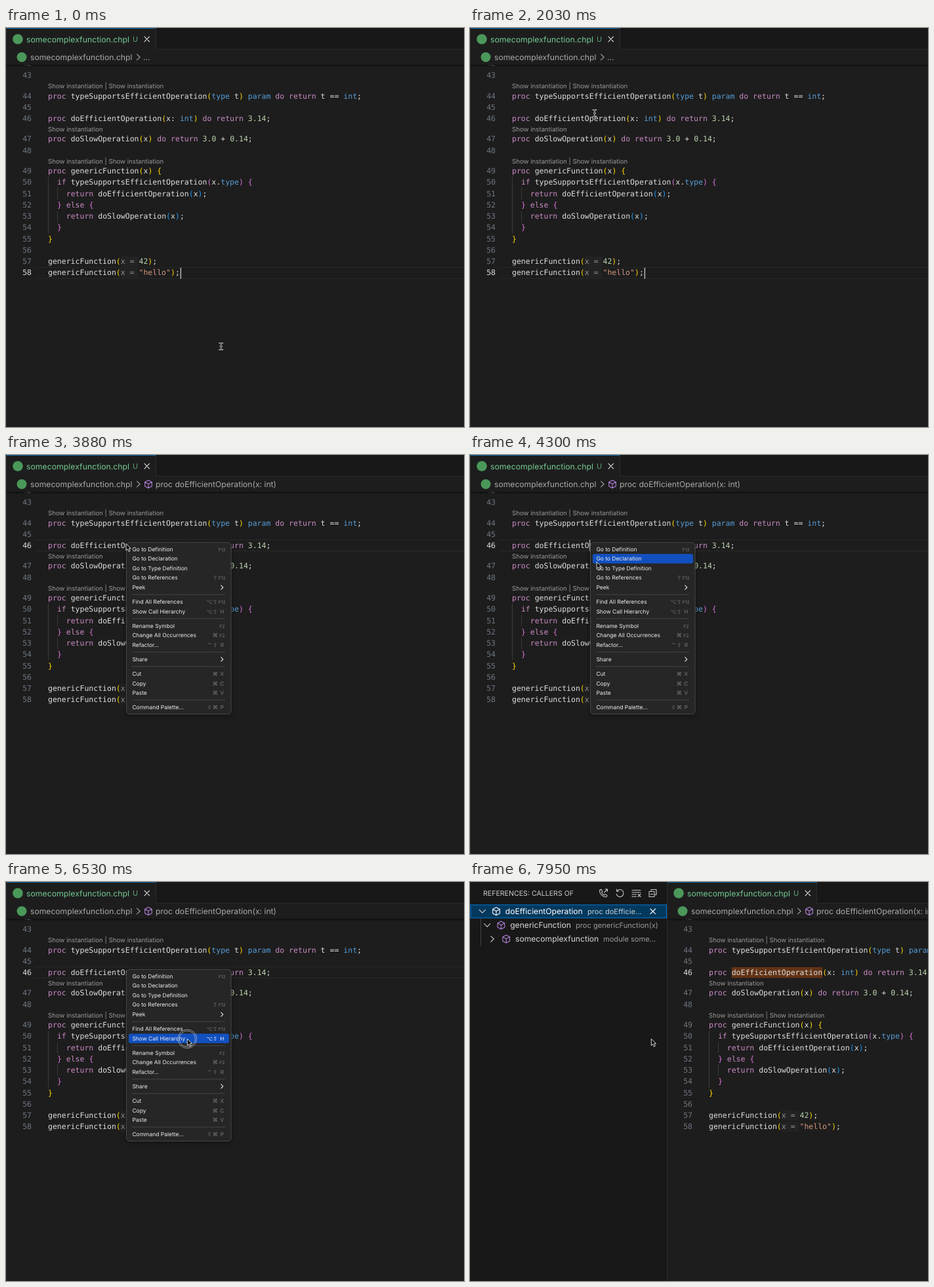
Write an HTML page that moves like this. It is 698 px wide and 609 px high and loops after 8 s.

```html
<!DOCTYPE html>
<html lang="en">
<head>
<meta charset="utf-8">
<title>Call hierarchy</title>
<style>
html, body { margin: 0; width: 100%; height: 100%; overflow: hidden; background: #1d1d1d; }
svg { display: block; }
text { white-space: pre; text-rendering: geometricPrecision; font-family: Inter, Roboto, sans-serif; }
.code { font: 11.51px "DejaVu Sans Mono", monospace; fill: #dedede; }
.num { text-anchor: end; fill: #6e7681; }
.num.on { fill: #dcdcdc; }
.lens { font-size: 9.7px; fill: #999; }
.tab { font-size: 12.28px; fill: #73c991; }
.crumb { font-size: 12.15px; fill: #ababab; }
.item { font-size: 8.47px; fill: #f0f0f0; }
.keys { font-size: 8.2px; fill: #7a7a7c; text-anchor: middle; }
.mod { font-family: "DejaVu Sans", sans-serif; }
.hot .keys { fill: #fff; }
.head { font-size: 10.6px; fill: #ccc; }
.row { font-size: 12.13px; fill: #d8d8d8; }
.desc { font-size: 11.1px; fill: #9c9c9c; }
.picked .row { fill: #fff; }
.picked .desc { fill: #c3ced6; }
.line { fill: none; stroke-width: 1.1; stroke-linejoin: round; stroke-linecap: round; }
</style>
</head>
<body>
<svg id="stage" width="698" height="609" viewBox="0 0 698 609">
  <defs>
    <clipPath id="below"><rect x="0" y="56" width="698" height="553"/></clipPath>
    <linearGradient id="fade" x1="0" y1="0" x2="0" y2="1">
      <stop offset="0" stop-color="#000" stop-opacity=".5"/>
      <stop offset="1" stop-color="#000" stop-opacity="0"/>
    </linearGradient>
    <filter id="drop" x="-20%" y="-20%" width="140%" height="140%">
      <feDropShadow dx="0" dy="3" stdDeviation="4" flood-opacity=".4"/>
    </filter>
    <path id="beamShape" d="M-2.4-5Q0-5 0-3.8Q0-5 2.4-5M0-3.8V3.8M-2.4 5Q0 5 0 3.8Q0 5 2.4 5M-1.1 0H1.1"/>
  </defs>
  <rect width="698" height="609" fill="#1d1d1d"/>
  <g id="editor">
    <rect width="698" height="33" fill="#181818"/>
    <path d="M229 32.5H698" stroke="#2b2b2b"/>
    <rect width="229" height="33" fill="#1d1d1d"/>
    <path d="M228.5 0V33" stroke="#2b2b2b"/>
    <rect width="229" height="1" fill="#0f68ac"/>
    <g clip-path="url(#below)">
      <path id="lineBox" fill="none" stroke="#282828"/>
      <rect id="mark" x="98.6" y="130" width="138.6" height="16.5" fill="#623315"/>
      <g id="code"></g>
      <rect y="56" width="698" height="4" fill="url(#fade)"/>
      <rect id="caret" width="1.5" height="17" fill="#b4b4b2"/>
    </g>
    <g id="bars"></g>
    <path d="M.5 0V609" stroke="#2b2b2b"/>
  </g>
  <g id="panel">
    <rect width="300" height="609" fill="#181818"/>
    <g id="panelHead"></g>
    <g id="rows"></g>
    <g id="subrow"></g>
  </g>
  <g id="menu">
    <rect x="183.5" y="133.5" width="159.5" height="262" rx="5" fill="#272728" stroke="#4b4b4d" stroke-width=".9" filter="url(#drop)"/>
  </g>
  <g id="ring" fill="none" stroke="#d8d8d8" stroke-opacity=".6">
    <circle r="14.4"/><circle r="12.2"/>
  </g>
  <g id="beam" fill="none" stroke-linecap="round">
    <use href="#beamShape" stroke="#dedede" stroke-width="2"/>
    <use href="#beamShape" stroke="#1a1a1a" stroke-width=".8"/>
  </g>
  <path id="arrow" d="M0 0V10.2L2.4 8L4 11.9L5.9 11.1L4.3 7.3H7.3Z" fill="#0a0a0a" stroke="#ececec" stroke-width=".9" stroke-linejoin="round"/>
</svg>
<script>
const LOOP = 8000;
const $ = id => document.getElementById(id);

function add(parent, tag, attrs, text) {
  const el = document.createElementNS("http://www.w3.org/2000/svg", tag);
  for (const k in attrs) el.setAttribute(k, attrs[k]);
  if (text !== undefined) el.textContent = text;
  return parent.appendChild(el);
}
const label = (parent, cls, x, y, text) => add(parent, "text", { class: cls, x, y }, text);
const icon = (parent, d, x, y, stroke) =>
  add(parent, "path", { class: "line", d, stroke, transform: `translate(${x} ${y})` });
const show = (el, on) => { el.style.display = on ? "" : "none"; };
const move = (el, x, y, more = "") => el.setAttribute("transform", `translate(${x} ${y}) ${more}`);

const CUBE = "M0-6L5.3-3.2V3.2L0 6L-5.3 3.2V-3.2ZM-5.3-3.2L0-.3L5.3-3.2M0-.3V6";
const CROSS = "M-3.8-3.8L3.8 3.8M3.8-3.8L-3.8 3.8";
const RIGHT = "M-2.3-4.4L2.3 0L-2.3 4.4";
const DOWN = "M-4.5-2.3L0 2.3L4.5-2.3";
const PURPLE = "#b180d7";

// Code, one entry per line: [number, middle y, text]
const LINES = [
  [42, 54.8, ""], [43, 72, ""],
  [44, 104, "proc typeSupportsEfficientOperation(type t) param do return t == int;"],
  [45, 121, ""],
  [46, 138.2, "proc doEfficientOperation(x: int) do return 3.14;"],
  [47, 169.8, "proc doSlowOperation(x) do return 3.0 + 0.14;"],
  [48, 187, ""],
  ...[
    "proc genericFunction(x) {",
    "  if typeSupportsEfficientOperation(x.type) {",
    "    return doEfficientOperation(x);",
    "  } else {",
    "    return doSlowOperation(x);",
    "  }",
    "}",
    "",
    "genericFunction(x = 42);",
    'genericFunction(x = "hello");'
  ].map((s, i) => [49 + i, 218.5 + 17.25 * i, s])
];
const BRACKETS = ["#ffd700", "#da70d6", "#179fff"];
const TOKEN = /x = |\b(?:proc|do|return|if|else)\b|\b(?:type|param|int)\b|"[^"]*"|\b\d[\d.]*|[(){}]|[A-Za-z]\w*|[^A-Za-z\d"(){}]+?/g;
let depth = 0;

function colour(tok) {
  if (/^[({]$/.test(tok)) return BRACKETS[depth++ % 3];
  if (/^[)}]$/.test(tok)) return BRACKETS[--depth % 3];
  if (tok === "x = ") return "#8f8f8f";
  if (/^(proc|do|return|if|else)$/.test(tok)) return "#c98ac4";
  if (/^(type|param|int)$/.test(tok)) return "#569cd6";
  if (tok[0] === '"') return "#d4967c";
  return /^\d/.test(tok) ? "#bad2ad" : "#dedede";
}

const code = $("code"), nums = {};
for (const y of [356.5, 373.75])
  add(code, "rect", { x: 174.6, y: y - 7.5, width: 27, height: 15, rx: 2, fill: "#232324" });
add(code, "path", { d: "M64.5 227V313.5M78.5 244.5V261.5M78.5 279V296", stroke: "#3c3c3c", fill: "none" });
for (const [n, y, src] of LINES) {
  nums[n] = label(code, "code num", 39, y + 3.6, n);
  const line = label(code, "code", 64, y + 3.6, "");
  for (const tok of src.match(TOKEN) || []) add(line, "tspan", { fill: colour(tok) }, tok);
}
const LENS = "Show instantiation";
label(code, "lens", 64, 92, LENS + " | " + LENS);
label(code, "lens", 64, 158, LENS);
label(code, "lens", 64, 207, LENS + " | " + LENS);

// Tab and breadcrumbs
const bars = $("bars");
add(bars, "circle", { cx: 18, cy: 17, r: 7.8, fill: "#4b985b" });
label(bars, "tab", 31, 21.5, "somecomplexfunction.chpl");
add(bars, "text", { class: "tab", x: 193, y: 21.3, style: "font-size:11px", opacity: .8 }, "U");
icon(bars, CROSS, 214.8, 17, "#e4e4e4");
add(bars, "circle", { cx: 24, cy: 44.5, r: 7.5, fill: "#4b985b" });
label(bars, "crumb", 37, 48.7, "somecomplexfunction.chpl");
icon(bars, RIGHT, 201.8, 44.5, "#a0a0a0");
const dots = label(bars, "crumb", 209, 48.7, "...");
const symbol = add(bars, "g", {});
icon(symbol, CUBE, 217, 44.5, PURPLE);
label(symbol, "crumb", 228, 48.7, "proc doEfficientOperation(x: int)");

// Context menu: "label|modifiers|key", empty for a separator
const menu = $("menu"), items = [];
let y = 143.5;
for (const entry of [
  "Go to Definition||F12", "Go to Declaration", "Go to Type Definition", "Go to References|⇧|F12", "Peek|>", "",
  "Find All References|⌥⇧|F12", "Show Call Hierarchy|⌥⇧|H", "",
  "Rename Symbol||F2", "Change All Occurrences|⌘|F2", "Refactor...|⌃⇧|R", "", "Share|>", "",
  "Cut|⌘|X", "Copy|⌘|C", "Paste|⌘|V", "", "Command Palette...|⇧⌘|P"
]) {
  if (!entry) {
    add(menu, "path", { d: `M192 ${y - 3.7}H334`, stroke: "#48484a", "stroke-width": .9 });
    y += 7.3;
    continue;
  }
  const [name, mods = "", key = ""] = entry.split("|");
  const g = add(menu, "g", {});
  const bar = add(g, "rect", { x: 187, y: y - 7.2, width: 153, height: 14.5, rx: 3, fill: "#1250bf" });
  label(g, "item", 192.4, y + 3, name);
  if (mods === ">") icon(g, "M-1.5-3L1.5 0L-1.5 3", 329.3, y, "#ececec");
  else [...mods].reverse().forEach((m, i) => label(g, "keys mod", 318.8 - 8.7 * i, y + 3, m));
  const k = label(g, "keys", 329.3, y + 3, key);
  if (key[0] === "F") k.style.fontSize = "6.8px";
  items.push({ g, bar, y });
  y += 14.65;
}

// References panel
const head = $("panelHead"), rows = $("rows"), sub = $("subrow");
label(head, "head", 20, 20.8, "REFERENCES: CALLERS OF");
[
  "M-3.6-5.6L-1.6-2.6L-2.8-1C-2 .8-.6 2.2 1.2 2.9L2.8 1.6L5.6 3.6C5.4 5.2 4 6 2.6 5.8C-2 5-5.6 1-6-3C-6-4.4-5-5.4-3.6-5.6ZM1-1L6-6M2.5-6H6V-2.5",
  "M-4.6-3A5.5 5.5 0 1 1-5.4 1.2M-5-6V-2.8H-1.8",
  "M-6.5-4.5H6.5M-6.5-1.2H6.5M-6.5 2H0M-6.5 5.2H0M2.5 1.5L6.5 5.5M6.5 1.5L2.5 5.5",
  "M-2.5-2.5V-5.5H5.5V2.5H2.5M-5.5-2.5H2.5V5.5H-5.5ZM-3.5 1.5H.5"
].forEach((d, i) => icon(head, d, 203.5 + 25 * i, 17, "#c5c5c5"));

function row(g, x, mid, chevron, tint, name, descX, desc) {
  icon(g, chevron, x, mid, "#c5c5c5");
  icon(g, CUBE, x + 21.2, mid, tint);
  label(g, "row", x + 35, mid + 4.3, name);
  label(g, "desc", descX, mid + 4.1, desc);
}
const picked = add(rows, "g", { class: "picked" });
add(picked, "rect", { x: .9, y: 34.9, width: 298.6, height: 20, fill: "#04395e", stroke: "#0078d4" });
row(picked, 18.8, 44.8, DOWN, "#fff", "doEfficientOperation", 179, "proc doEfficie...");
icon(picked, CROSS, 278.7, 44.8, "#fff");
row(rows, 26.2, 66, DOWN, PURPLE, "genericFunction", 161, "proc genericFunction(x)");
add(rows, "path", { d: "M16.5 56V76.5", stroke: "#454545" });
row(sub, 34, 87, RIGHT, PURPLE, "somecomplexfunction", 203, "module some...");
add(sub, "path", { d: "M16.5 76.5V97.5", stroke: "#454545" });

// Pointer stops: [time, x, y]
const PATH = [
  [50, 327.7, 486], [430, 459, 221], [630, 459, 221], [1230, 380, 118], [1450, 380, 118],
  [2030, 190, 130], [2300, 183, 135.5], [3880, 183, 135.5], [4900, 219, 234],
  [5450, 219, 234], [6350, 276.3, 239.4]
];
const clamp = v => Math.min(1, Math.max(0, v));
const ease = u => u < .5 ? 4 * u ** 3 : 1 - 4 * (1 - u) ** 3;

function pointerAt(t) {
  const next = PATH.findIndex(p => p[0] > t);
  const i = next < 0 ? PATH.length - 1 : Math.max(1, next);
  const [t0, x0, y0] = PATH[i - 1], [t1, x1, y1] = PATH[i];
  const u = ease(clamp((t - t0) / (t1 - t0)));
  return [x0 + (x1 - x0) * u, y0 + (y1 - y0) * u];
}

const PRESS = 2930, MENU = 2980, CRUMB = 3100, CLOSE = 6640, PANEL = 6780, TREE = 6980, CHILD = 7160;
const CLICKS = [[2900, 3150], [6420, 6680]];

function render(t) {
  const [x, y] = pointerAt(t), moved = t >= PRESS, open = t >= PANEL;

  move($("editor"), open ? 300 : 0, 0);
  show($("panel"), open);
  show(rows, t >= TREE);
  show(sub, t >= CHILD);
  show($("mark"), t >= TREE);

  nums[46].classList.toggle("on", moved);
  nums[58].classList.toggle("on", !moved);
  $("lineBox").setAttribute("d", `M44 ${moved ? 129.5 : 365.5}H698M44 ${moved ? 146.5 : 382.5}H698`);
  show($("lineBox"), t < TREE);
  show(dots, t < CRUMB);
  show(symbol, t >= CRUMB);

  // The caret blinks every half second, restarting at the press
  const beat = moved ? Math.floor((t - PRESS) / 500) : Math.floor((t + 300) / 500);
  show($("caret"), beat % 2 === 0 && !open);
  move($("caret"), moved ? 181.8 : 265.6, moved ? 129.6 : 365.8);

  show(menu, t >= MENU && t < PANEL - 10);
  menu.style.opacity = 1 - clamp((t - CLOSE) / 130);
  for (const it of items) {
    const hot = x > 187 && Math.abs(y - it.y) < 7.3;
    show(it.bar, hot);
    it.g.classList.toggle("hot", hot);
  }

  const click = CLICKS.find(([a, b]) => t >= a && t < b);
  show($("ring"), click);
  if (click) {
    move($("ring"), x, y, `scale(${.6 + .4 * clamp((t - click[0]) / 100)})`);
    $("ring").style.opacity = Math.min(clamp((t - click[0]) / 80), clamp((click[1] - t) / 80));
  }

  show($("beam"), t < MENU);
  show($("arrow"), t >= MENU);
  move($("beam"), x, y);
  move($("arrow"), x, y);
}

function tick() {
  render(performance.now() % LOOP);
  requestAnimationFrame(tick);
}
tick();
</script>
</body>
</html>
```
